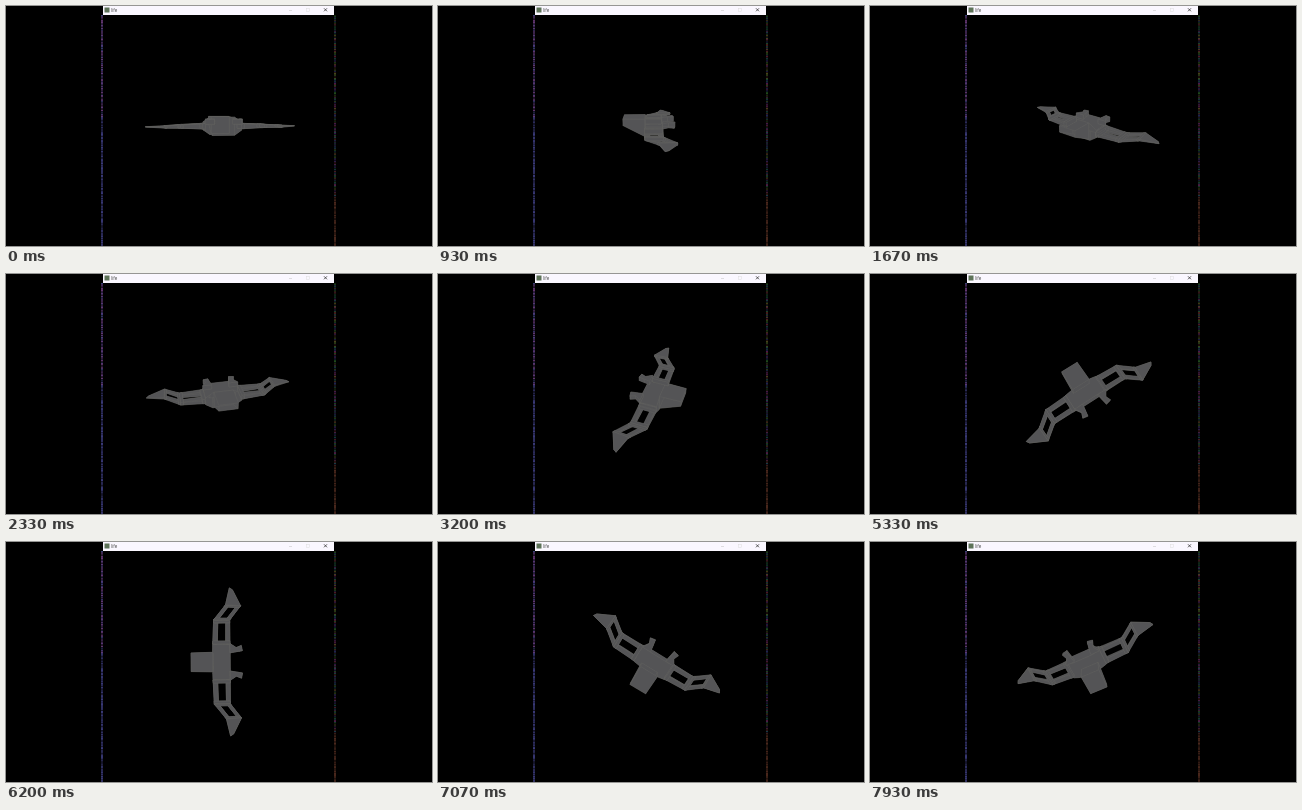
An HTML page with a canvas for the animation above (8000 ms loop, 426 by 240 pixels).

```html
<!DOCTYPE html>
<html lang="en">
<head>
<meta charset="utf-8">
<title>Spinning ship</title>
<style>
  html, body { margin: 0; width: 100%; height: 100%; overflow: hidden; background: #000; }
  canvas { display: block; width: 100vw; height: 100vh; }
</style>
</head>
<body>
<canvas id="stage" width="426" height="240"></canvas>
<script>
const ctx = document.getElementById('stage').getContext('2d');
const FPS = 15, STEPS = 120, RAD = Math.PI / 180;
const CENTER = { x: 216, y: 120 }, DEPTH = 300;

const mix = (a, b, k) => a.map((n, i) => n + (b[i] - n) * k);

// Outlines are [forward, sideways]; the two functions give bottom and top heights.
const solid = (outline, low, high) =>
  outline.map(([f, v]) => [f, v, low(f, v), high(f, v)]);
const slab = (outline, half) => solid(outline, (f, v) => -half(v), (f, v) => half(v));
const mirror = part => part.map(([f, v, lo, hi]) => [f, -v, lo, hi]);
const wingHalf = v => 3.4 * (1 - v / 76);

// A panel between a leading and a trailing edge, with a rectangular opening.
function framedPanel(leadIn, leadOut, trailIn, trailOut) {
  const at = (span, chord) =>
    mix(mix(leadIn, leadOut, span), mix(trailIn, trailOut, span), chord);
  const strip = (s0, s1, c0, c1) =>
    slab([at(s0, c0), at(s1, c0), at(s1, c1), at(s0, c1)], wingHalf);
  return [strip(0, 1, 0, 0.26), strip(0, 1, 0.76, 1),
          strip(0, 0.12, 0, 1), strip(0.88, 1, 0, 1)];
}

function buildShip() {
  const lead = [[9, 18], [8, 42], [-4, 57]];
  const trail = [[-8, 18], [-8, 42], [-19, 56]];
  const wing = [0, 1].flatMap(i =>
    framedPanel(lead[i], lead[i + 1], trail[i], trail[i + 1]));
  const tip = slab([lead[2], trail[2], [-11, 72], [-8, 74]], wingHalf);
  const engine = solid(
    [[-8, 18], [-14, 14], [-19, 16], [-20, 11], [-14, 10], [-8, 9]],
    () => 2, () => 7);
  const hull = slab(
    [[9, 18], [9, 11], [9, -11], [9, -18], [-8, -18], [-8, -11], [-8, 11], [-8, 18]],
    v => Math.min(9, 4 + (18 - Math.abs(v)) * 0.7));
  const nose = solid([[30, 9], [30, -9], [9, -9.5], [9, 9.5]],
    f => (f - 9) * 0.52 - 8, () => 9.5);
  const half = [...wing, tip, engine];
  return [hull, nose, ...half, ...half.map(mirror)];
}
const ship = buildShip();

function projector(t) {
  const spin = (101.5 + 66.3 * t + 28 * (1 - Math.exp(-t))) * RAD;
  const tilt = (2 + 14.2 * t) * RAD;
  const cs = Math.cos(spin), sn = Math.sin(spin);
  const ct = Math.cos(tilt), st = Math.sin(tilt);
  return (f, v, h) => {
    const x = f * cs - v * sn, y = f * sn + v * cs;
    const scale = DEPTH / (DEPTH + y * ct - h * st);
    return [CENTER.x + x * scale, CENTER.y - (y * st + h * ct) * scale];
  };
}

function face(points) {
  ctx.beginPath();
  points.forEach(([x, y]) => ctx.lineTo(x, y));
  ctx.closePath();
  ctx.fill();
  ctx.stroke();
}

function drawShip(t) {
  const project = projector(t);
  ctx.fillStyle = '#545456';
  ctx.strokeStyle = '#66666280';
  ctx.lineWidth = 0.7;
  for (const part of ship) {
    const bottom = part.map(([f, v, lo]) => project(f, v, lo));
    const top = part.map(([f, v, , hi]) => project(f, v, hi));
    face(bottom);
    part.forEach((_, i) => {
      const j = (i + 1) % part.length;
      face([bottom[i], bottom[j], top[j], top[i]]);
    });
    face(top);
  }
}

function rect(color, x, y, w, h) {
  ctx.fillStyle = color;
  ctx.fillRect(x, y, w, h);
}

function cross(x, y, r) {
  ctx.beginPath();
  ctx.moveTo(x - r, y - r); ctx.lineTo(x + r, y + r);
  ctx.moveTo(x + r, y - r); ctx.lineTo(x - r, y + r);
  ctx.stroke();
}

// Thin window edges made of dim, seeded coloured specks.
function drawEdges() {
  let seed = 7;
  const random = () => (seed = seed * 16807 % 2147483647) / 2147483647;
  for (let y = 9; y < 240; y++) {
    const lower = y > 110;
    rect(`hsl(${lower ? 240 : 230 + 60 * random()} 35% ${10 + 25 * random()}%)`, 95, y, 2, 1);
    rect(`hsl(${y > 190 ? 15 : 360 * random()} 45% ${6 + 14 * random()}%)`, 328, y, 2, 1);
  }
}

function drawWindow() {
  drawEdges();
  rect('#faf7ff', 97, 0, 231, 9);
  rect('#5d7358', 98.5, 1.5, 5, 5);
  ctx.fillStyle = '#444';
  ctx.font = '4.5px "Open Sans", sans-serif';
  ctx.fillText('life', 105, 5.6);
  rect('#ccc', 283, 4, 3, 0.6);
  ctx.lineWidth = 0.5;
  ctx.strokeStyle = '#ddd';
  ctx.strokeRect(300.5, 2.5, 3, 3);
  ctx.lineWidth = 0.8;
  ctx.strokeStyle = '#333';
  cross(319.5, 3.8, 1.5);
}

function draw(now) {
  const step = Math.floor((now + 5) * FPS / 1000) % STEPS;
  rect('#000', 0, 0, 426, 240);
  drawWindow();
  drawShip(step / FPS);
  requestAnimationFrame(draw);
}
requestAnimationFrame(draw);
</script>
</body>
</html>
```
